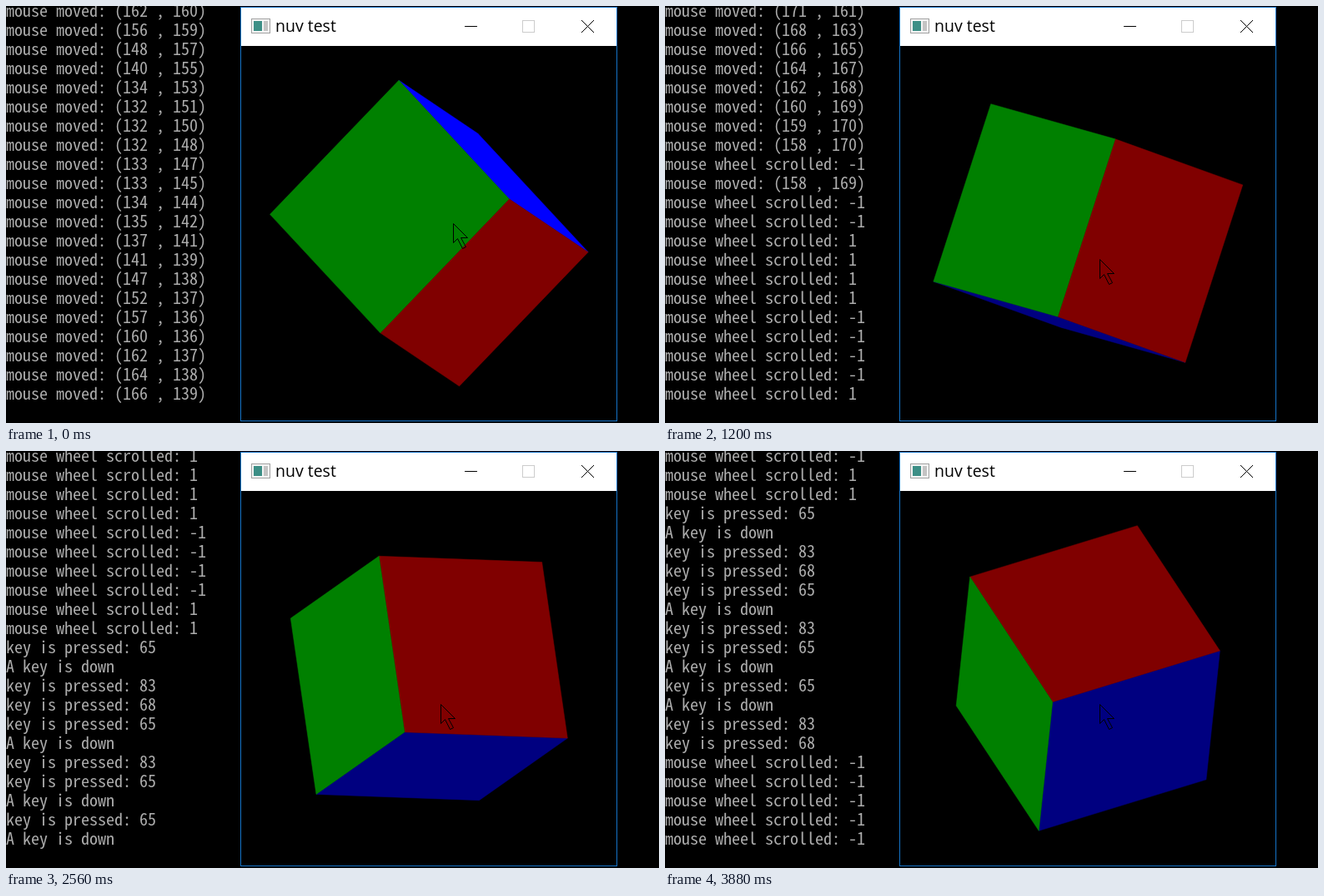
Animation, 783 px wide and 501 px high, one loop 3.93 s. Source, as an HTML page with a canvas:

```html
<!DOCTYPE html>
<html lang="en">
<head>
<meta charset="utf-8">
<title>nuv test</title>
<style>
  html, body { margin: 0; width: 100%; height: 100%; overflow: hidden; background: #000; }
  canvas { display: block; }
</style>
</head>
<body>
<canvas id="stage" width="783" height="501"></canvas>
<script>
const ctx = document.getElementById('stage').getContext('2d');
const LOOP = 3930, TICKS = 84, ROWS = 21, ROW_HEIGHT = 23;
const MONO = '"Noto Sans Mono CJK SC", "Noto Sans Mono CJK JP", "Liberation Mono", monospace';

// The mouse follows a smooth curve, passing one of these points every four moves.
const mousePath = [
  [162, 160], [134, 153], [133, 147], [137, 141], [157, 136], [166, 139],
  [171, 146], [172, 158], [164, 167], [158, 170], [162, 166]
];
const LAST_MOVE = 37;

function mouseAt(move) {
  const knot = Math.floor(move / 4), u = move / 4 - knot;
  const point = i => mousePath[Math.max(0, Math.min(mousePath.length - 1, i))];
  return [0, 1].map(k => {
    const [a, b, c, d] = [-1, 0, 1, 2].map(i => point(knot + i)[k]);
    return Math.round(b + u / 2 * (c - a + u * (2 * a - 5 * b + 4 * c - d + u * (3 * (b - c) + d - a))));
  });
}

const log = [];
const addLine = (time, text, isMove = false) => log.push({ time, text, isMove });
const addMove = (time, move) => addLine(time, `mouse moved: (${mouseAt(move).join(' , ')})`, true);

function addWheel(start, step, count, gap) {
  for (let i = 0; i < count; i++) addLine(start + i * gap, `mouse wheel scrolled: ${step}`);
}

function addKeys(start, keys, gap) {
  [...keys].forEach((key, i) => {
    addLine(start + i * gap, `key is pressed: ${key.charCodeAt(0)}`);
    if (key === 'A') addLine(start + i * gap, 'A key is down');
  });
}

for (let i = 0; i < LAST_MOVE; i++) addMove(i < ROWS ? 0 : 50 + 31 * (i - ROWS), i);
addWheel(600, -1, 1, 0);
addMove(640, LAST_MOVE);
addWheel(680, -1, 2, 40);
addWheel(750, 1, 4, 30);
addWheel(940, -1, 4, 45);
addWheel(1200, 1, 2, 50);
addKeys(1400, 'ASDASAASD', 180);
addWheel(3040, -1, 5, 70);

const axisLength = Math.hypot(0.6, 0.4, 1);
const AXIS = [-0.6, -0.4, 1].map(v => v / axisLength);
const CENTER = [507.3, 273], HALF = 112.2;
const faces = [
  { axis: 0, side: 1, color: '#0000ff' },
  { axis: 0, side: -1, color: '#000080' },
  { axis: 1, side: -1, color: '#800000' },
  { axis: 2, side: 1, color: '#008000' }
];

// Rotated unit vectors for a turn about AXIS.
function rotatedBasis(angle) {
  const c = Math.cos(angle), s = Math.sin(angle), k = 1 - c;
  const [x, y, z] = AXIS;
  return [
    [c + x * x * k, x * y * k + z * s, x * z * k - y * s],
    [x * y * k - z * s, c + y * y * k, y * z * k + x * s],
    [x * z * k + y * s, y * z * k - x * s, c + z * z * k]
  ];
}

function path(points, closed = true) {
  ctx.beginPath();
  points.forEach(([x, y]) => ctx.lineTo(x, y));
  if (closed) ctx.closePath();
}

function strokeLine(color, ...points) {
  ctx.strokeStyle = color;
  path(points, false);
  ctx.stroke();
}

function fillBox(color, ...box) {
  ctx.fillStyle = color;
  ctx.fillRect(...box);
}

function drawCube(t) {
  const tick = Math.min(TICKS - 1, Math.round(t * TICKS / LOOP));
  const basis = rotatedBasis((53.7 + 1.193 * tick) * Math.PI / 180);
  for (const { axis, side, color } of faces) {
    const n = basis[axis], p = basis[(axis + 1) % 3], q = basis[(axis + 2) % 3];
    if (n[2] * side <= 0) continue;
    const corner = (u, v) => [
      CENTER[0] + HALF * (n[0] * side + p[0] * u + q[0] * v),
      CENTER[1] - HALF * (n[1] * side + p[1] * u + q[1] * v)
    ];
    path([corner(-1, -1), corner(1, -1), corner(1, 1), corner(-1, 1)]);
    ctx.fillStyle = ctx.strokeStyle = color;
    ctx.fill();
    ctx.lineWidth = 0.5;
    ctx.stroke();
  }
  ctx.lineWidth = 1;
}

function drawWindow() {
  ctx.strokeStyle = '#1473c8';
  ctx.strokeRect(281.5, 1.5, 451, 497);
  fillBox('#fff', 282, 2, 450, 46);

  fillBox('#a0a0a0', 294, 15, 23, 18);
  fillBox('#f4f4f4', 295, 16, 21, 16);
  fillBox('#3d8f86', 297, 18, 10, 12);
  fillBox('#c4c4c4', 309, 18, 5, 12);

  ctx.fillStyle = '#000';
  ctx.font = '19.5px "Open Sans", "Noto Sans", sans-serif';
  ctx.fillText('nuv test', 323, 31);

  strokeLine('#000', [550, 24.5], [565, 24.5]);
  ctx.strokeStyle = '#ccc';
  ctx.strokeRect(619.5, 17.5, 14, 14);
  strokeLine('#000', [690, 17], [705, 32]);
  strokeLine('#000', [705, 17], [690, 32]);
}

function drawConsole(lines) {
  ctx.font = `20px ${MONO}`;
  const size = 200 / ctx.measureText('0').width;
  ctx.font = `${size}px ${MONO}`;
  ctx.fillStyle = '#acacac';
  lines.slice(-ROWS).forEach(({ text }, row) => ctx.fillText(text, 0, 13 + row * ROW_HEIGHT));
}

function drawCursor(lines) {
  // The pointer runs one step ahead of the log.
  const move = Math.min(lines.filter(line => line.isMove).length, LAST_MOVE);
  const [mouseX, mouseY] = mouseAt(move);
  const x = Math.round(284 + 1.5 * mouseX) + 0.5;
  const y = Math.round(50.5 + 1.5 * mouseY) + 0.5;
  const arrow = [[0, 0], [0, 23], [5, 18], [11, 30], [15, 28], [9, 17], [17, 17]];
  path(arrow.map(([dx, dy]) => [x + dx, y + dy]));
  ctx.strokeStyle = '#000';
  ctx.stroke();
}

function draw(t) {
  const lines = log.filter(line => line.time <= t);
  fillBox('#000', 0, 0, 783, 501);
  drawConsole(lines);
  drawWindow();
  drawCube(t);
  drawCursor(lines);
}

const start = performance.now();
function loop() {
  draw((performance.now() - start) % LOOP);
  requestAnimationFrame(loop);
}
loop();
</script>
</body>
</html>
```
